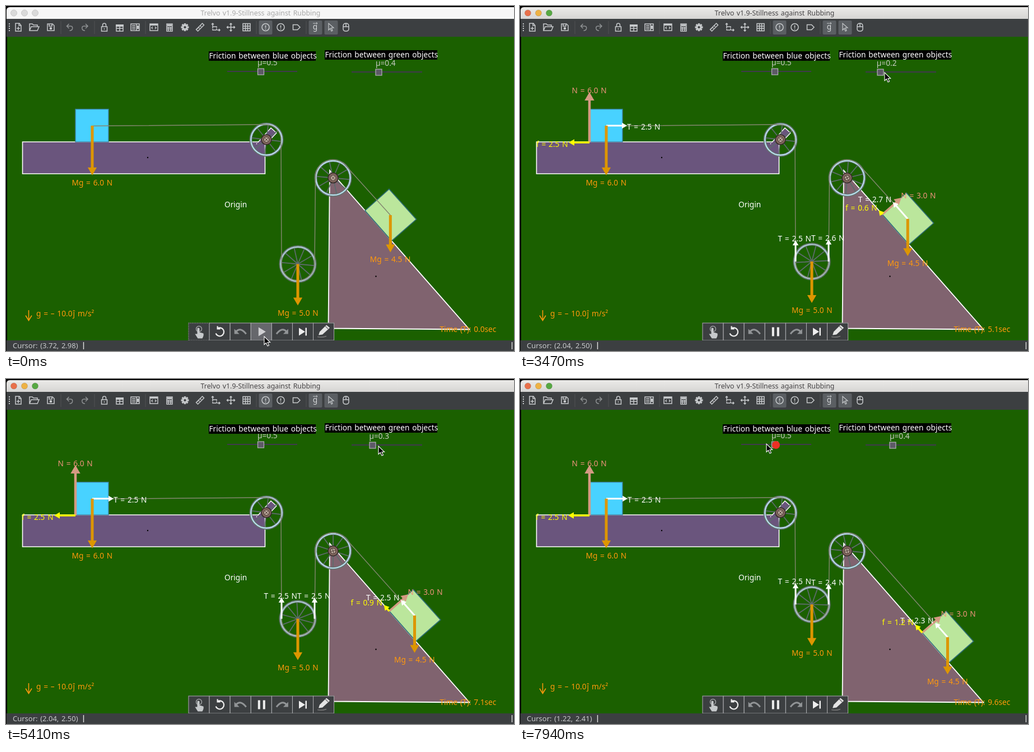
These frames come from a looping animation (907 px wide and 617 px high, 8000 ms). An HTML page:

```html
<!DOCTYPE html>
<html lang="en">
<head>
<meta charset="utf-8">
<title>Pulley simulation</title>
<style>
  html, body { margin: 0; width: 100%; height: 100%; overflow: hidden; background: #000; }
  svg { display: block; width: 907px; height: 617px; font: 13.7px "Noto Sans", "Open Sans", sans-serif; word-spacing: 1.2px; }
  text { white-space: pre; }
  .icon { fill: none; stroke: #c6c9cb; stroke-width: 1.5; }
  .solid { fill: #c6c9cb; stroke: none; }
  .mg { fill: #ff990c; }
</style>
</head>
<body>
<svg viewBox="0 0 907 617">
  <defs>
    <linearGradient id="bar" x2="0" y2="1">
      <stop stop-color="#ebeae8"/><stop offset="1" stop-color="#d6d5d3"/>
    </linearGradient>
  </defs>
  <rect width="907" height="617" fill="#000"/>
  <path id="titleBar" d="M1 23V8Q1 2 7 2H907V23Z"/>
  <g id="lights"></g>
  <text id="title" x="454.5" y="17" text-anchor="middle" font-size="12.3">Trelvo v1.9-Stillness against Rubbing</text>
  <rect x="1" y="23" width="906" height="32" fill="#3c3f41"/>
  <rect x="2" y="55" width="905" height="543" fill="#1b6000"/>
  <g id="tools"></g>

  <g id="sliders">
    <path d="M395 117H520M617 118H743" stroke="#41394e" stroke-width="2"/>
    <g fill="#c8ccc4">
      <text x="449" y="106">μ=0.5</text>
      <text id="mu" y="107"></text>
    </g>
    <g fill="#5d5a66" stroke="#b5b3ba" stroke-width="1.2">
      <rect x="449.5" y="112" width="11" height="11"/>
      <rect id="knob" y="113" width="11" height="11"/>
    </g>
    <path d="M362 81H553V98H362ZM569 79H770V96H569Z" fill="#000"/>
    <g fill="#fff">
      <text x="362.5" y="94">Friction between blue objects</text>
      <text x="569.5" y="92">Friction between green objects</text>
    </g>
  </g>

  <g stroke="#fff" stroke-width="1.8">
    <path d="M578 294L827.500 578.500L575.500 576.500Z" fill="#80636f"/>
    <path d="M29.500 243H462.500V300H29.500Z" fill="#6a557d" stroke-width="1.600"/>
    <path d="M447 247L473 218L483 227L462 249" fill="#6a557d" stroke-width="1.300"/>
  </g>
  <path d="M448 244H461V256H450Z" fill="#6a557d"/>
  <rect x="124" y="184.500" width="59" height="58.500" fill="#48d2ff" stroke="#3b7fa0" stroke-width="1.400"/>
  <path id="block" d="M684 327.500L732.500 381.500L688.500 420L641 366Z" fill="#bbe69c" stroke="#2f6e78" stroke-width="1.600"/>
  <g fill="#000">
    <circle cx="253" cy="271" r="1.200"/><circle cx="409" cy="349.500" r="1.200"/><circle cx="660.500" cy="483.500" r="1.200"/>
  </g>
  <text x="390" y="360" fill="#fff">Origin</text>

  <g id="wheels"></g>
  <path id="rope" fill="none" stroke="#83876f" stroke-width="1.400"/>
  <g id="forces"></g>

  <g class="mg">
    <path d="M40.500 544V562M35 553.500L40.500 562.500L46 553.500" fill="none" stroke="#ff990c" stroke-width="1.500"/>
    <text x="54" y="555">g = – 10.0</text>
    <text x="119.500" y="555">ĵ</text>
    <text x="128" y="555">m/s²</text>
    <text id="clock" x="774.500" y="583"></text>
  </g>

  <g id="player"></g>
  <rect x="1" y="598" width="906" height="19" fill="#3c3f41"/>
  <text id="status" x="12" y="612" fill="#c8cacc" font-size="13"></text>
  <path d="M138.500 601V614M903.500 601V614" stroke="#e4e4e4" stroke-width="1.400"/>
  <circle id="click" fill="#ec3024"/>
  <path id="cursor" d="M0 0V14.500L3.400 11.500L6 17L8.500 16L6 10.500H10.600Z" fill="#000" stroke="#fff" stroke-width="1.100"/>
</svg>
<script>
const $ = id => document.getElementById(id);
const set = (el, attrs) => { for (const k in attrs) el.setAttribute(k, attrs[k]); };
const LOOP = 8000, PLAY = 60, UNIT = 14.8;
const DIR = [0.661, 0.751];                    // down the slope
const ACC = 15.15;                             // px/s²
const SLIP = 2380, GLIDE = 4670, BRAKE = 5747; // ms

const icon = (x, y, d, extra = '') => `<path class="icon" transform="translate(${x} ${y})" d="${d}" ${extra}/>`;
const solid = (x, y, d) => `<path class="solid" transform="translate(${x} ${y})" d="${d}"/>`;
const ring = r => `M${-r} 0a${r} ${r} 0 1 0 ${2 * r} 0a${r} ${r} 0 1 0 ${-2 * r} 0`;

function buildTools() {
  const cell = x => `<rect x="${x - 12}" y="26" width="24" height="25" rx="2" fill="#5b5f63"/>`;
  const seps = [98, 158, 249, 447, 536]
    .map(x => `<path d="M${x} 27V50" stroke="#505355"/>`).join('');
  const gear = Array.from({ length: 8 }, (_, i) =>
    `<rect class="solid" x="-1.700" y="-7" width="3.400" height="4" transform="translate(319.500 38) rotate(${i * 45})"/>`).join('');
  $('tools').innerHTML = seps + cell(463.5) + cell(552.5) + cell(580.5) + gear +
    solid(6, 38, 'M-1-7h2v2h-2zM-1-3h2v2h-2zM-1 1h2v2h-2zM-1 5h2v2h-2z') +
    icon(22, 38, 'M-5-7H2L5-3V7H-5ZM1-7V-3H5M0-1V5M-3 2H3') +
    icon(50, 38, 'M-8 6V-6H-3L-1-4H6V-1M-8 6L-5-1H9L6 6Z') +
    icon(80, 38, 'M-6-6H3L6-3V6H-6ZM-3-6V-2H2V-6') + solid(80, 40, ring(2.3)) +
    icon(113.5, 38, 'M-1-6L-5-2L-1 2M-5-2H2Q6-2 5 3Q4 6 0 6', 'opacity=".6"') +
    icon(141, 38, 'M1-6L5-2L1 2M5-2H-2Q-6-2-5 3Q-4 6 0 6', 'opacity=".6"') +
    icon(175.5, 38, 'M-5-1H5V7H-5ZM-3-1V-4Q-3-7 0-7Q3-7 3-4V-1M0 2V4') +
    icon(203, 39, 'M-6-5H6V6H-6ZM-6 1H6M0-5V6') + solid(203, 39, 'M-7-6H7V-2H-7Z') +
    icon(230, 38, 'M-7-6H8V6H-7ZM-5-3H1M-5 0H1M-5 3H1M3-6V6') + solid(230, 38, 'M4-3H7V3H4Z') +
    icon(264, 38, 'M-7-6H7V6H-7ZM-2-1L-4 1L-2 3M2-1L4 1L2 3') + solid(264, 38, 'M-7-6H7V-3H-7Z') +
    icon(292, 38, 'M-5-6H5V7H-5ZM-5 0H5M-5 3H5M-2 0V7M2 0V7') + solid(292, 38, 'M-4-5H4V-2H-4Z') +
    icon(319.5, 38, ring(3.6), 'style="stroke-width:3"') +
    icon(346.5, 38, 'M-7 4L4-7L7-4L-4 7ZM-3 0L-1 2M0-3L2-1M-5 2L-4 3') +
    icon(374, 38, 'M-5-7V5H8M-7-5L-5-7L-3-5M6 3L8 5L6 7M-5-1H2V5', 'stroke-dasharray="9 1"') +
    icon(401.5, 38, 'M0-7V7M-7 0H7M-2-5L0-7L2-5M-2 5L0 7L2 5M-5-2L-7 0L-5 2M5-2L7 0L5 2') +
    icon(429.5, 38, 'M-6.500-6.500H6.500V6.500H-6.500ZM-2-6V6M2-6V6M-6-2H6M-6 2H6') +
    [463.5, 490.5].map(x => icon(x, 38, ring(6.5) + 'M0-3.500V1M0 2.500V4')).join('') +
    icon(518.5, 38, 'M-6-4.500H2L6.500 0L2 4.500H-6Z') +
    `<text x="552" y="42" text-anchor="middle" fill="#d5d7d9">g</text>` +
    icon(552, 31, 'M-4 0H4M2-2L4 0L2 2', 'style="stroke-width:1"') +
    icon(580, 38, 'M-4-7V5L-1 2L1 7L3 6L1 1H5Z', 'style="stroke-width:1.200"') +
    icon(607, 38, 'M-5-2Q-5-7 0-7Q5-7 5-2V3Q5 7 0 7Q-5 7-5 3ZM-5-1H5M0-7V-1');
}

function buildPlayer() {
  const y = 582.5, cx = i => 344.5 + i * 37.1;
  let s = '<rect x="325.500" y="566.500" width="260" height="32" fill="#3c3f41"/>';
  for (let i = 0; i < 7; i++)
    s += `<rect id="btn${i}" x="${326 + i * 37.1}" y="567" width="37" height="31" fill="#3c3f41" stroke="#a9abad"/>`;
  s += solid(cx(0), y, 'M-3-6Q-1-8 1-6V1L8 3Q9 7 6 12H-2L-7 4L-3 4Z') +
    icon(cx(0), y - 5, ring(5), 'stroke-opacity=".7"') +
    icon(cx(1), y, 'M-4-6A7.500 7.500 0 1 1-7 3M-4-10V-5H1', 'style="stroke-width:2.200;stroke:#eee"') +
    `<g opacity=".62">` +
    icon(cx(2), y, 'M-8 0Q0-9 10 4', 'style="stroke-width:3"') + solid(cx(2), y, 'M-11-5V4H-2Z') +
    icon(cx(4), y, 'M8 0Q0-9-10 4', 'style="stroke-width:3"') + solid(cx(4), y, 'M11-5V4H2Z') + '</g>' +
    `<path id="play" transform="translate(${cx(3)} ${y})" d="M-5-8L8 0L-5 8Z" fill="#d0d0d3"/>` +
    `<path id="pause" transform="translate(${cx(3)} ${y})" d="M-6-8H-2V8H-6ZM3-8H7V8H3Z" fill="#eee"/>` +
    `<path transform="translate(${cx(5)} ${y})" d="M-7-7L4 0L-7 7ZM4.500-7H7V7H4.500Z" fill="#eee"/>` +
    `<path transform="translate(${cx(6)} ${y})" d="M-9 6L-7 0L5-12L11-7L-2 5Z" fill="#e4e4e4"/>` +
    icon(cx(6), y, 'M-11 9Q-4 11 5 8M3-10L8-5', 'style="stroke:#777"');
  $('player').innerHTML = s;
}

function wheel(id, x, y, r, spokes, hub) {
  let d = '';
  for (let i = 0; i < spokes; i++) {
    const a = 2 * Math.PI * (i + 0.15) / spokes;
    d += `M0 0L${r * Math.cos(a)} ${r * Math.sin(a)}`;
  }
  const axle = hub ? `<circle r="9" fill="#80655d" stroke="#332a28" stroke-width="1.500"/>
    <circle r="4.800" fill="#bca99c" stroke="#4a3a35"/><path d="M-3-3L3 3M3-3L-3 3" stroke="#4a3a35"/>` : '';
  return `<g id="${id}" transform="translate(${x} ${y})"><path d="${d}" stroke="#5d6b6c" stroke-width="1.800"/>
    <circle r="${r}" fill="none" stroke="#65726f" stroke-width="5"/>
    <circle r="${r - 0.3}" fill="none" stroke="${hub ? '#b9e0f0' : '#abcbd0'}" stroke-width="2.200"/>${axle}</g>`;
}

// Arrow from (x,y) along unit vector (ux,uy)
function arrow(x, y, ux, uy, len, w, head, color) {
  const n = Math.max(len - head, 0), h = head * 0.58;
  const p = (a, b) => `${(x + ux * a - uy * b).toFixed(2)} ${(y + uy * a + ux * b).toFixed(2)}`;
  return `<path fill="${color}" d="M${p(0, -w / 2)}L${p(n, -w / 2)}L${p(n, -h)}L${p(len, 0)}L${p(n, h)}L${p(n, w / 2)}L${p(0, w / 2)}Z"/>`;
}
const label = (x, y, s, color) => `<text x="${x}" y="${y}" fill="${color}">${s} N</text>`;

function slide(t) {
  const dt = (from, to) => Math.min(Math.max(t - from, 0), to - from) / 1000;
  const v = ACC * (GLIDE - SLIP) / 1000;
  const a = dt(SLIP, GLIDE), b = dt(GLIDE, BRAKE), c = dt(BRAKE, LOOP);
  return ACC * a * a / 2 + v * (b + c) - ACC * c * c / 2;
}

function forces(t, s, cy) {
  const GOLD = '#dd9600', TEXT = '#ff990c', PINK = '#d49a82', ROSE = '#f0937c', W = '#fff', Y = '#ffff00';
  const [ux, uy] = DIR, bx = 686.3 + ux * s, by = 374 + uy * s, kx = 641 + ux * s, ky = 366 + uy * s;
  const mode = t < SLIP || (t >= GLIDE && t < BRAKE) ? 0 : t < GLIDE ? 1 : -1;
  const weight = (x, y, m, lx, ly) =>
    arrow(x, y, 0, 1, m * UNIT, 5, 14, GOLD) + label(lx, ly, 'Mg = ' + m.toFixed(1), TEXT);
  let out = '';
  if (t >= PLAY) {
    const T = 2.5 + 0.2 * mode, R = 2.5 + 0.1 * mode, f = 0.9 - 0.3 * mode;
    const tip = (x, y, n) => [x - ux * n * UNIT, y - uy * n * UNIT];
    const [tx, ty] = tip(bx, by, T), [fx, fy] = tip(kx, ky, f), nudge = mode === 1 ? 1 : 0;
    out += arrow(124, 244, 0, -1, 90, 4.5, 15, PINK) + label(92.5, 156, 'N = 6.0', ROSE) +
      arrow(124, 244, -1, 0, 38 - nudge, 3.5, 10, Y) + label(28 + nudge, 252, 'f = 2.5', Y) +
      arrow(154, 214, 1, 0, 38 - nudge, 3, 9, W) + label(192 - nudge, 221, 'T = 2.5', W) +
      arrow(492, cy, 0, -1, 38, 3, 9, W) + label(460.5, cy - 36, 'T = 2.5', W) +
      arrow(551, cy, 0, -1, R * UNIT + 1, 3, 9, W) + label(520, cy + 1 - R * UNIT, 'T = ' + R.toFixed(1), W) +
      arrow(kx, ky, uy, -ux, 45, 3.5, 12, PINK) + label(bx - 12, by - 37, 'N = 3.0', ROSE) +
      arrow(bx, by, -ux, -uy, T * UNIT, 3, 9, W) + label(tx - 62, ty + 0.5, 'T = ' + T.toFixed(1), W) +
      arrow(kx, ky, -ux, -uy, f * UNIT + 1, 3.5, 9, Y) + label(fx - 60, fy, 'f = ' + f.toFixed(1), Y);
  }
  return out + weight(154, 214, 6, 117.5, 321) + weight(521, cy, 5, 485, cy + 92) +
    weight(bx, by, 4.5, bx - 36.5, by + 84);
}

// Cursor stops: time, x, y
const stops = [[60, 461, 591], [800, 664, 118], [2120, 664, 118], [2240, 657, 119], [2420, 645, 119],
  [2700, 645, 119], [3200, 651, 119], [4560, 651, 119], [4720, 665, 120], [5650, 665, 120],
  [5780, 672, 119], [6230, 672, 119], [6560, 510, 116], [6700, 500, 116], [7300, 457, 116],
  [7800, 457, 116], [7940, 440, 116]];

function cursorAt(t) {
  const i = stops.findIndex(p => p[0] > t);
  if (i === 0) return stops[0].slice(1);
  if (i < 0) return stops[stops.length - 1].slice(1);
  const [a, x0, y0] = stops[i - 1], [b, x1, y1] = stops[i];
  const k = (t - a) / (b - a), e = k * k * (3 - 2 * k);
  return [x0 + (x1 - x0) * e, y0 + (y1 - y0) * e];
}

function draw(t) {
  const live = t >= PLAY, s = slide(t), cy = 461.5 - s / 2, deg = s * 180 / Math.PI;
  const mu = t < 2160 ? 4 : t < SLIP ? 3 : t < GLIDE ? 2 : t < BRAKE ? 3 : 4;
  const bx = 686.3 + DIR[0] * s, by = 374 + DIR[1] * s;

  set($('titleBar'), { fill: live ? 'url(#bar)' : '#f6f6f6' });
  set($('title'), { fill: live ? '#454345' : '#a9a9a9' });
  ['#e8704a', '#eeb244', '#57a843'].forEach((c, i) =>
    set($('lights').children[i], { fill: live ? c : '#dadada', stroke: live ? '#0002' : '#c8c8c8' }));
  set($('btn3'), { fill: live ? '#3c3f41' : '#66676c' });
  set($('btn0'), { 'stroke-dasharray': live ? 'none' : '1.500 1.500' });
  set($('play'), { visibility: live ? 'hidden' : 'visible' });
  set($('pause'), { visibility: live ? 'visible' : 'hidden' });

  set($('mu'), { x: 660 - (4 - mu) * 11.6 });
  $('mu').textContent = 'μ=0.' + mu;
  set($('knob'), { x: 660 - (4 - mu) * 11 });
  set($('block'), { transform: `translate(${DIR[0] * s} ${DIR[1] * s})` });
  set($('top'), { transform: `translate(584 307.500) rotate(${deg / 31})` });
  set($('hanging'), { transform: `translate(521 ${cy}) rotate(${-deg / 60})` });
  set($('rope'), { d: `M154 214.500L464 212A27 27 0 0 1 491 239L492 ${cy}A29.500 29.500 0 0 0 551 ${cy}L552.500 307.500A31 31 0 0 1 607.500 286.500L${bx} ${by}` });
  $('forces').innerHTML = forces(t, s, cy);
  $('clock').textContent = `Time (T): ${(live ? t / 1000 + 1.675 : 0).toFixed(1)}sec`;
  $('status').textContent = `Cursor: (${t < 700 ? '3.72, 2.98' : t < 6500 ? '2.04, 2.50' : '1.22, 2.41'})`;

  const [x, y] = cursorAt(t);
  set($('cursor'), { transform: `translate(${x} ${y})` });
  const late = t > 7000;
  const r = late ? Math.min(Math.max((t - 7780) / 12, 0), 7) : t > 2060 && t < 2300 ? (2300 - t) / 20 : 0;
  set($('click'), { cx: late ? 457 : 662, cy: late ? 118 : 122, r });
}

$('lights').innerHTML = [14, 33, 52].map(x => `<circle cx="${x}" cy="12.500" r="5.500"/>`).join('');
buildTools();
buildPlayer();
$('wheels').innerHTML = wheel('left', 465, 239, 28, 8, true) +
  wheel('top', 584, 307.5, 31, 10, true) + wheel('hanging', 521, 461.5, 31, 10, false);

let start;
function tick(now) {
  start ??= now;
  draw((now - start) % LOOP);
  requestAnimationFrame(tick);
}
draw(0);
requestAnimationFrame(tick);
</script>
</body>
</html>
```
